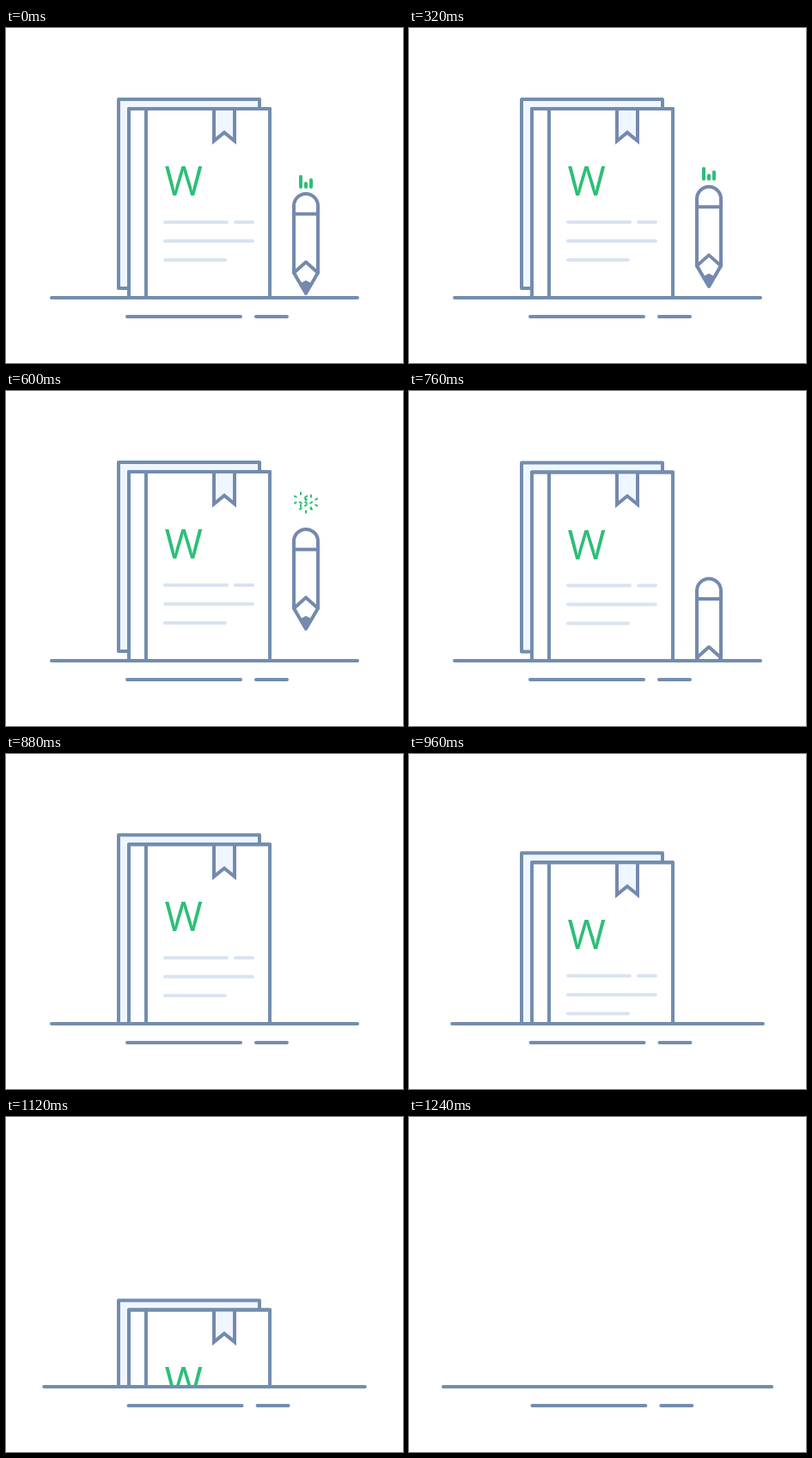
Write an HTML page that moves like this. It is 462 by 390 pixels and loops after 1.28 s.

```html
<!DOCTYPE html>
<html lang="en">
<head>
<meta charset="utf-8">
<title>Book and pencil</title>
<style>
  html, body { margin: 0; width: 100%; height: 100%; overflow: hidden; background: #fff; }
  svg { display: block; width: 462px; height: 390px; }
  path { fill: none; stroke: #738dad; stroke-width: 4; stroke-linecap: round; stroke-linejoin: round; }
  .accent { stroke: #7589ae; }
  .white { fill: #fff; }
  .tint { fill: #eff6ff; }
  .copy { stroke: #dae3f1; }
  .green { stroke: #2dbe78; }
  .dash { stroke-width: 2; }
  text { font: 48px "Open Sans", "Noto Sans", sans-serif; fill: #2dbe78; }
</style>
</head>
<body>
<svg viewBox="0 0 462 390">
  <defs><clipPath id="above"><rect width="462" height="313"/></clipPath></defs>
  <g clip-path="url(#above)">
    <g id="book">
      <path class="tint" d="M131 83H295V303H131Z"/>
      <path class="white" d="M143 94H307V330H143Z"/>
      <path d="M163 94V330"/>
      <path class="tint accent" style="stroke-linejoin:miter;stroke-linecap:butt" d="M242 94V131.5L254 121.7L266 131.5V94"/>
      <path d="M143 94H307"/>
      <text x="184.5" y="195">W</text>
      <path class="copy" d="M185 226H257M267 226H287M185 248H287M185 270H255"/>
    </g>
    <g id="pencil">
      <path class="white accent" d="M335 207a14 14 0 0 1 28 0V285L349 309L335 285Z"/>
      <path class="accent" d="M335 216.5H363M335 285L349 272.5L363 285"/>
      <path class="accent" style="fill:#7589ae;stroke-width:2" d="M343.5 298L349 295L354.5 298L349 308Z"/>
    </g>
    <path id="bars" class="green" d="M343 173V185M349 181V185M355 177V185"/>
    <path id="burst" class="green dash"/>
  </g>
  <path id="ground"/>
  <path id="shadow" d="M141 336H273M291 336H327"/>
</svg>
<script>
const LOOP = 1280, STEP = 40;
const PENCIL_LIFT = 42.8, BAR_LIFT = 49;
const BURST_START = 480, BURST_END = 720;
const CENTERS = [[343, 126.5], [349, 133.5], [355, 129.5]];

const el = id => document.getElementById(id);
const book = el('book'), pencil = el('pencil'), bars = el('bars');
const burst = el('burst'), ground = el('ground'), shadow = el('shadow');

const progress = (t, from, to) => Math.min(1, Math.max(0, (t - from) / (to - from)));
const easeOut = u => 1 - (1 - u) ** 2;
const fall = (t, from) => (0.01178 * Math.max(0, t - from)) ** 3;
const shift = (node, x, y) => node.setAttribute('transform', `translate(${x} ${y})`);
const show = (node, visible) => node.setAttribute('visibility', visible ? 'visible' : 'hidden');

function burstPath(u) {
  const outer = 9.6 * easeOut(u) + 1;
  const inner = Math.max(0, outer - 2.2 * Math.min(1, 3 * (1 - u)));
  let d = '';
  for (const [cx, cy] of CENTERS) {
    for (let i = 0; i < 6; i++) {
      const a = Math.PI / 2 + i * Math.PI / 3;
      const at = r => `${cx + r * Math.cos(a)} ${cy + r * Math.sin(a)}`;
      d += `M${at(inner)}L${at(outer)}`;
    }
  }
  return d;
}

function draw(t) {
  const rise = easeOut(progress(t, 309, 419));
  shift(pencil, 0, fall(t, 413) - PENCIL_LIFT * rise);
  shift(bars, 0, -BAR_LIFT * rise);
  show(bars, t < BURST_START);

  const u = progress(t, BURST_START, BURST_END);
  show(burst, t >= BURST_START && u < 1);
  burst.setAttribute('d', burstPath(u));

  shift(book, 0, fall(t, 689.5));

  const spread = Math.max(0, t - 880);
  const reach = 178 + 0.0365 * spread;
  ground.setAttribute('d', `M${231 - reach} 314H${231 + reach}`);
  shift(shadow, 0.0065 * spread, 0);
}

let start;
function tick(now) {
  start ??= now;
  const t = (now - start) % LOOP;
  draw(Math.floor(t / STEP) * STEP);
  requestAnimationFrame(tick);
}
draw(0);
requestAnimationFrame(tick);
</script>
</body>
</html>
```
